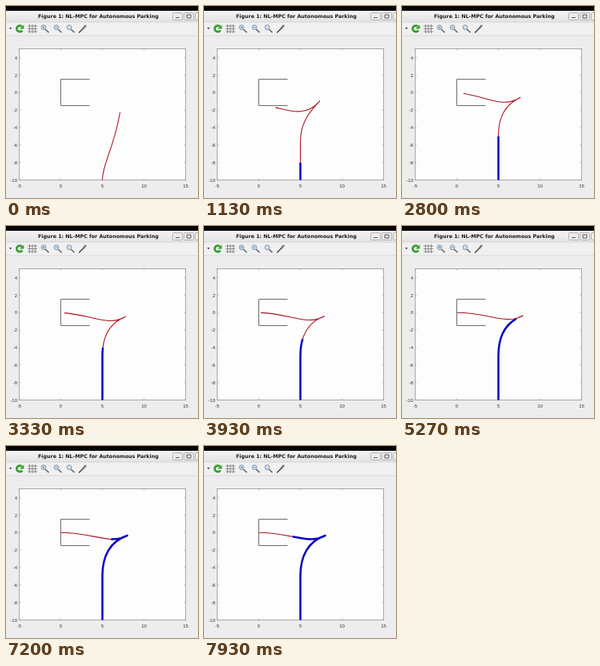
Write an HTML page that moves like this. It is 240x240 px and loops after 8 s.

```html
<!DOCTYPE html>
<html lang="en">
<head>
<meta charset="utf-8">
<title>Autonomous Parking</title>
<style>
  html, body { margin: 0; width: 100%; height: 100%; overflow: hidden; background: #ededed; }
  svg { display: block; width: 100vw; height: 100vh; }
  .title { font: bold 6.33px "DejaVu Sans", sans-serif; fill: #1c1c1c; }
  .label { font: 6px "Liberation Sans", Arial, sans-serif; fill: #333; }
  .line { fill: none; stroke-linejoin: round; }
</style>
</head>
<body>
<svg viewBox="0 0 240 240">
  <defs>
    <linearGradient id="bar" x2="0" y2="1">
      <stop offset="0" stop-color="#f5f5f5"/>
      <stop offset="1" stop-color="#e2e2e2"/>
    </linearGradient>
    <g id="lens">
      <path d="M1.5 1.5L5 4.6" stroke="#6a6a6a" stroke-width="1.6" stroke-linecap="round"/>
      <circle cx="-1" cy="-1.3" r="2.9" fill="#cfe0ee" stroke="#8099b3" stroke-width="1"/>
    </g>
    <rect id="button" y="8.5" width="12" height="9" rx="1" fill="#ececec" stroke="#a4a4a4" stroke-width=".8"/>
  </defs>

  <!-- window frame -->
  <rect width="240" height="240" fill="#ededed"/>
  <rect width="240" height="6" fill="#050505"/>
  <rect y="6" width="240" height="14" fill="url(#bar)"/>
  <text class="title" x="40" y="15">Figure 1: NL-MPC for Autonomous Parking</text>
  <use href="#button" x="208.5"/>
  <use href="#button" x="222.5"/>
  <use href="#button" x="236.5"/>
  <path class="line" d="M212 14.5H217M226 11H231V15H226Z" stroke="#555"/>

  <!-- toolbar -->
  <rect y="20" width="240" height="17" fill="#f0f0f0"/>
  <path d="M0 20.2H240M0 37H240" stroke="#d4d4d4" stroke-width=".8"/>
  <path d="M3.8 27h3.6l-1.8 2.2z" fill="#444"/>
  <path class="line" d="M19.8 25.6A3.8 3.8 0 1 0 20.4 30.4" stroke="#35a02c" stroke-width="2.8"/>
  <path d="M17 28.6L22.4 23.4V28.6Z" fill="#35a02c"/>
  <path d="M29.5 23V34M33 23V34M36.5 23V34M27 25H39M27 28.5H39M27 32H39" stroke="#808080" stroke-width=".9"/>
  <use href="#lens" x="48" y="28"/>
  <use href="#lens" x="64" y="28"/>
  <use href="#lens" x="80" y="28"/>
  <path d="M45.5 26.7h3M47 25.2v3M61.5 26.7h3" stroke="#6d87a3" stroke-width=".7"/>
  <path d="M91.5 33L97 27.5" stroke="#444" stroke-width="1.5" stroke-linecap="round"/>
  <path d="M96.5 28L100 24" stroke="#777" stroke-width="2.6"/>

  <!-- axes -->
  <rect x="16.5" y="53.5" width="208" height="164" fill="#fdfdfd" stroke="#949494" stroke-width=".8"/>
  <g id="axes"></g>
  <path class="line" d="M104.5 91.5H68.5V124.5H104.5" stroke="#6c6c6c"/>
  <path id="trail" class="line" stroke="#0800be" stroke-width="2.5"/>
  <path id="plan" class="line" stroke="#a81624" stroke-width="1.1"/>
</svg>
<script>
const LOOP = 8000;
const $ = id => document.getElementById(id);
const px = x => 68.5 + x * 10.4;
const py = y => 108.2 - y * 10.93;

function drawAxes() {
  let out = "";
  const tick = d => `<path d="${d}" stroke="#949494" stroke-width=".6"/>`;
  const label = (x, y, anchor, s) => `<text class="label" x="${x}" y="${y}" text-anchor="${anchor}">${s}</text>`;
  for (let x = -5; x <= 15; x += 5)
    out += tick(`M${px(x)} 217.5v-2M${px(x)} 53.5v2`) + label(px(x), 227.4, "middle", x);
  for (let y = -10; y <= 4; y += 2)
    out += tick(`M16.5 ${py(y)}h2M224.5 ${py(y)}h-2`) + label(14, py(y) + 2.2, "end", y);
  $("axes").innerHTML = out;
}

// Each plan: y where the turn starts, control points to the cusp, control points back to the goal
const first = [217, 120.5, 197, 135, 178, 142.5, 133, 135, 178, 120.5, 197, 120.5, 217];
const early = [160, 120.5, 139, 128, 126, 145, 116, 126, 131, 105, 118, 83, 109];
const final = [162, 120.5, 138, 130, 119, 151.5, 112, 130, 124, 108, 108, 68.5, 108.2];

const forward = p => `M120.5 217.5V${p[0]}C${p.slice(1, 7).join(" ")}`;
const whole = p => `${forward(p)}C${p.slice(7).join(" ")}`;
const mix = (a, b, u) => a.map((v, i) => v + (b[i] - v) * u);
const settle = x => 1 - Math.exp(-Math.max(0, x));

// The optimiser first finds the reversing manoeuvre, then refines it
const planAt = step => mix(mix(first, early, settle(step * 0.9)), final, settle((step - 4) / 1.7));

// The solver gets faster as the goal comes nearer
function stepAt(t) {
  if (t < 2200) return Math.floor((t + 200) / 600);
  if (t < 5245) return Math.min(9, 4 + Math.floor((t - 2200) / 500));
  return 10 + Math.floor((t - 5245) / 365);
}

drawAxes();
const trail = $("trail");
const plan = $("plan");
trail.setAttribute("d", forward(final));
const cusp = trail.getTotalLength();
trail.setAttribute("d", whole(final));

// Steady speed, braking into the cusp, then steady reverse
function driven(step) {
  if (step > 13) return cusp + (step - 13) * 10.5;
  return Math.min(step * 10.93, cusp - 8 * ((13 - step) / 3) ** 1.6);
}

function frame() {
  const step = stepAt(performance.now() % LOOP);
  const done = driven(step);
  trail.style.visibility = step ? "visible" : "hidden";
  trail.setAttribute("stroke-dasharray", `${done} 999`);
  plan.setAttribute("d", whole(planAt(step)));
  plan.setAttribute("stroke-dasharray", `0 ${done} 999`);
  requestAnimationFrame(frame);
}
frame();
</script>
</body>
</html>
```
